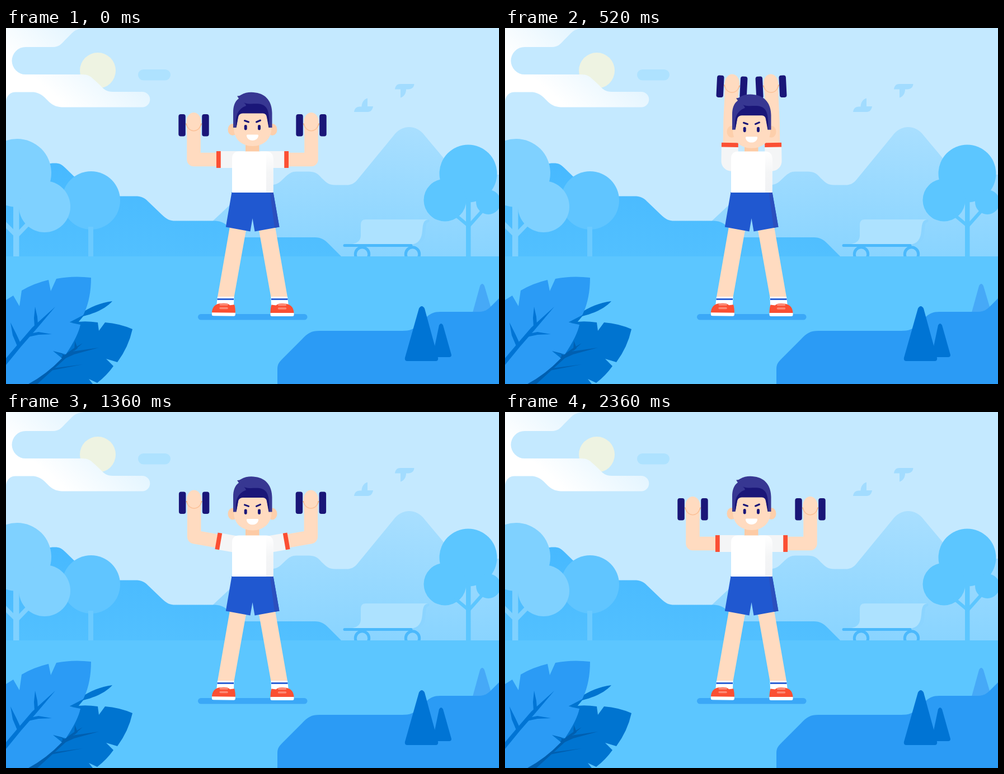
Recreate the animation shown at these times as an HTML page. Size 881 by 636 pixels, loop 2.4 s.

```html
<!DOCTYPE html>
<html lang="en">
<head>
<meta charset="utf-8">
<title>Dumbbell press</title>
<style>
html, body { margin: 0; width: 100%; height: 100%; overflow: hidden; background: #5cc6ff; }
svg { display: block; width: 100%; height: 100%; }
</style>
</head>
<body>
<svg viewBox="0 0 881 636" preserveAspectRatio="none">
  <defs>
    <linearGradient id="cloud" gradientUnits="userSpaceOnUse" x1="120" y1="0" x2="45" y2="85">
      <stop offset="0" stop-color="#e4f5ff"/><stop offset="1" stop-color="#fff"/>
    </linearGradient>
    <linearGradient id="mount" gradientUnits="userSpaceOnUse" x1="0" y1="176" x2="0" y2="408">
      <stop offset="0" stop-color="#a9dfff"/><stop offset="1" stop-color="#89d4ff"/>
    </linearGradient>
    <linearGradient id="hill" gradientUnits="userSpaceOnUse" x1="0" y1="241" x2="0" y2="408">
      <stop offset="0" stop-color="#47b9ff"/><stop offset="1" stop-color="#52c0ff"/>
    </linearGradient>
    <linearGradient id="fold" gradientUnits="userSpaceOnUse" x1="0" y1="222" x2="0" y2="294">
      <stop offset="0" stop-color="#fff"/><stop offset=".5" stop-color="#f4f5f6"/><stop offset="1" stop-color="#f1f2f4"/>
    </linearGradient>
    <clipPath id="above"><rect width="881" height="408"/></clipPath>
    <g id="bell">
      <path d="M-14.500 3h29l-3 8h-23z" fill="#e8955c"/>
      <path d="M-12.200 20V4H12.200V20z" fill="#ffdbc0"/>
      <g fill="#1a1678">
        <rect x="-27.200" y="-13.500" width="12.500" height="39.500" rx="4"/>
        <rect x="14.700" y="-13.500" width="12.500" height="39.500" rx="4"/>
      </g>
      <ellipse rx="13.200" ry="16.500" fill="#ffdbc0"/>
      <path d="M-12.500 6C-9 19.500 9 19.500 12.500 6" fill="none" stroke="#fbc197" stroke-width="1.500"/>
    </g>
    <g id="sleeve">
      <path d="M-27.500-12.700H23V-1A18 18 0 0 1 5 17.200H-27.500z" fill="#f4f5f6"/>
      <rect x="-27.800" y="-12.700" width="7.800" height="29.900" fill="#fb4f33"/>
    </g>
  </defs>

  <rect width="881" height="636" fill="#c4e9ff"/>
  <circle cx="164" cy="76" r="32" fill="#eef3e2"/>
  <path d="M0 0H141C130 1 124 3 118 9L105 22C99 29 94 34 84 34H35A24.500 24.500 0 0 0 35 83H136C146 83 151 86 157 92L168 102C175 110 180 114 191 114H243.500A13.700 13.700 0 0 1 243.500 141.500H104C91 141.500 85 139 77 132L69 124C61 117 55 114.500 46 114.500H17C8 114.500 2 120 0 130z" fill="url(#cloud)"/>
  <rect x="236" y="74" width="58" height="19.500" rx="9.700" fill="#aee2ff"/>
  <g fill="#a2dcff">
    <path d="M622 150C623 144 626 140.500 632 140.500H635.500C636 132 640 127 646 125.500V140H656C655 146 652 150 646 150z"/>
    <path d="M695 109.500C696 103 699 100 705 100H729.500C729 106 725 109.500 719 109.500H715C715 117 711 123 705 124.500V109.500z"/>
  </g>

  <path d="M350 363L428 290C436 282 442 280.500 450 280.500H472C483 280.500 488 277 496 269C505 260 510 256.500 519 256.500H541C552 256.500 557 260 564 268C573 277 578 280.500 588 280.500H608C617 280.500 622 278 628 271L692 193C707 171.500 734 171.500 749 193L790 242C800 254 815 262 881 262V408H350z" fill="url(#mount)"/>
  <path d="M0 290L62 252C70 244 76 241.500 87 241.500C96 241.500 100 244 106 250L145 288C154 297 160 300.500 170 300.500H231C242 300.500 247 303 254 310L278 333C287 342 293 344.500 303 344.500H370C382 344.500 388 347 394 352L406 363C414 371 420 374 430 374H552C563 374 569 378 576 385L599 408H0z" fill="url(#hill)"/>
  <rect y="408" width="881" height="228" fill="#5cc6ff"/>

  <circle cx="152" cy="308" r="52" fill="#60c5ff"/>
  <rect x="147" y="355" width="9" height="53" fill="#6bcaff"/>
  <g fill="#7fd1ff">
    <circle cx="20" cy="259" r="61"/>
    <circle cx="69" cy="319" r="46"/>
    <rect x="13" y="318" width="10.500" height="90"/>
    <path d="M18 370L-3 349M19 371L45 344" stroke="#7fd1ff" stroke-width="8"/>
  </g>

  <g fill="#5cc6ff">
    <circle cx="826" cy="260" r="51.500"/>
    <circle cx="784.500" cy="307.500" r="38"/>
    <circle cx="862" cy="311" r="22"/>
    <rect x="822" y="308" width="8.500" height="100"/>
    <path d="M826 353L802 333M826 355L850 328" stroke="#5cc6ff" stroke-width="6"/>
  </g>

  <path d="M754 344.500C747 346 748 354 747 365C746 380 738 386 725 386.500" fill="none" stroke="#8bd4ff" stroke-width="5" stroke-linecap="round"/>
  <path d="M612 386.500C628 386 634 380 634 370V351Q634 342 643 342H755C746 343 745 350 744 361C743 377 737 386 724 386.500z" fill="#ade2ff"/>
  <g stroke="#4bb9fc" fill="none" stroke-width="5" clip-path="url(#above)">
    <path d="M605 388.500H724" stroke-linecap="round"/>
    <circle cx="636.500" cy="404" r="12.200"/>
    <circle cx="726.500" cy="404" r="12.200"/>
  </g>

  <path d="M834 508L847 461Q851 453 855 461L869 508z" fill="#46a9f7"/>
  <path d="M485 636V609C485 601 488 597 494 591L529 556C539 545 546 541 560 541H708C722 541 729 538 737 530L747 521C757 510 765 507 776 507H845C856 507 861 503 868 496L881 483V636z" fill="#2b9bf5"/>
  <g fill="#0074d4">
    <path d="M738 501Q743 493 748 501L772 589Q773 595 768 595H717Q712 595 713 589z"/>
    <path d="M774 531Q777.500 525 781 531L796 584Q796 588 792 588H762z"/>
  </g>

  <g fill="#0074d0">
    <path d="M113 526C135 506 160 492 190 488C180 499 165 508 138 515L128 527z"/>
    <path d="M40 636L113 527Q138 522 164 526L166 541L177 526Q203 528 226 538Q219 570 199 597L179 591L192 604Q180 621 163 634L148 627L155 636z"/>
  </g>
  <g fill="#005fb0">
    <path d="M56 636L122 576L137 563L120 573L66 612L40 636z"/>
    <path d="M102 592L100 578L84 577L102 583L108 588L118 578L166 571L122 583z"/>
    <path d="M122 577L123 559L128 572zM83 608L137 601L80 612z"/>
  </g>
  <path d="M0 486L13 478L24 497L28 469Q50 456 76 450L80 470L90 448Q120 442 152 446Q152 485 138 513L113 526L133 530Q129 550 107 583L84 577L100 590Q72 619 40 636H0z" fill="#2b9bf5"/>
  <g fill="#0074d4">
    <path d="M0 590L22 564L47 535L88 498L55 537L27 569L0 602z"/>
    <path d="M51 534L50 518L52 498L56 516L57 529zM38 547L58 543L82 547L58 548L35 553zM20 568L12 549L8 526L19 548L25 561z"/>
  </g>

  <rect x="343" y="511" width="195.500" height="10.500" rx="5.200" fill="#3ba8f7"/>
  <g id="arms">
    <g><path fill="none" stroke="#ffdbc0" stroke-width="24.500" stroke-linejoin="round"/><use href="#sleeve"/><use href="#bell"/></g>
    <g transform="matrix(-1 0 0 1 881 0)"><path fill="none" stroke="#ffdbc0" stroke-width="24.500" stroke-linejoin="round"/><use href="#sleeve"/><use href="#bell"/></g>
  </g>

  <path d="M400 355L429 361L407.500 481H378zM481 355L452 361L473.500 481H503z" fill="#ffdbc0"/>
  <path d="M378 480H407.500L407 497H376zM473.500 480H503L505 497H474z" fill="#fff"/>
  <path d="M377.500 484.500H407M474 484.500H503.500" stroke="#2f63d6" stroke-width="3"/>
  <g id="shoe" transform="rotate(1 389 503)">
    <path d="M368 509.500C368 498 375 492 385 492C393 491 397 492 400 495L408 494Q410 500 410 509.500z" fill="#fb4f33"/>
    <path d="M368 508.500H410V512Q410 514.500 407 514.500H371Q368 514.500 368 512z" fill="#fff"/>
    <path d="M383 494H395M383 500.500H395" stroke="#fd8b76" stroke-width="3.500" stroke-linecap="round"/>
  </g>
  <use href="#shoe" transform="matrix(-1 0 0 1 882.500 .5) rotate(-1 389 503)"/>

  <path d="M403.500 293H477.500L488.500 355.500L444.500 363.500L440.500 340L436.500 363.500L392.800 355.500z" fill="#2058d0"/>
  <path d="M471.500 293H477.500L488.500 355.500L480 357z" fill="#2b4fbd"/>
  <rect x="428" y="200" width="24.500" height="24" fill="#fdcba5"/>
  <path d="M404 294V233Q404 220.500 417 220.500H464Q477.500 220.500 477.500 233V294z" fill="#fff"/>
  <path d="M465 294V222Q477.500 222 477.500 234V294z" fill="url(#fold)"/>

  <g id="head">
    <g fill="#fdcfab"><ellipse cx="405" cy="181.500" rx="8.500" ry="10.500"/><ellipse cx="476" cy="181.500" rx="8.500" ry="10.500"/></g>
    <path d="M407 148H474.500V178C474.500 199 460 211 440.700 211S407 199 407 178z" fill="#ffdbc0"/>
    <path d="M406 178V151C406 139 409 131 416 126L413 121.500Q417 122 420 119.500C428 115 437 114 446 115.500C465 118 475.500 132 475.500 152V178H470L465 152H416L411.500 178z" fill="#373792"/>
    <path d="M411.500 178C409 159 413 145 429 139Q428 135 425 133.500C437 138 447 133 458 137C468 141 471 151 470.500 178H469.500L466 159Q465 152.500 459 152.500H423Q416.500 152.500 415 159z" fill="#1a1678"/>
    <path d="M426.500 165.500L433.500 168M447.500 168L454.500 165" stroke="#1a1678" stroke-width="3" stroke-linecap="round"/>
    <g fill="#1a1678"><rect x="425.700" y="173" width="5" height="9.500" rx="2.400"/><rect x="450" y="173" width="5" height="9.500" rx="2.400"/></g>
    <path d="M431.500 190.500H449.500Q451.500 190.500 451 193C449 203.500 432 203.500 430 193Q429.500 190.500 431.500 190.500z" fill="#fff"/>
  </g>
</svg>
<script>
const LOOP = 2400, STEP = 40;
const PIVOT = { x: 403.75, y: 232.75 };
const head = document.getElementById('head');
const arms = [...document.getElementById('arms').children];

const lift = [[0, 0], [40, .04], [280, .71], [440, .985], [520, 1.01], [720, 1.005], [960, 1],
  [1000, .99], [1120, .72], [1360, .11], [1480, .02], [1640, 0], [2400, 0]];
const lean = [[0, 0], [280, 0], [520, 2.8], [1000, 0], [2400, 0]];
const tilt = [[0, 0], [280, -2.5], [480, 0], [2400, 0]];

// Monotone cubic through the keys, flat at both ends.
function ease(keys, t) {
  const slope = i => (keys[i + 1][1] - keys[i][1]) / (keys[i + 1][0] - keys[i][0]);
  const tangent = i => {
    if (i === 0 || i === keys.length - 1) return 0;
    const a = slope(i - 1), b = slope(i);
    return a * b > 0 ? 2 * a * b / (a + b) : 0;
  };
  let i = 0;
  while (i < keys.length - 2 && t >= keys[i + 1][0]) i++;
  const [t0, v0] = keys[i], [t1, v1] = keys[i + 1];
  const d = t1 - t0, u = (t - t0) / d, w = 1 - u;
  return v0 * (1 + 2 * u) * w * w + v1 * u * u * (3 - 2 * u) +
    d * u * w * (tangent(i) * w - tangent(i + 1) * u);
}

function poseArm(arm, angle, lean, tilt) {
  const [limb, sleeve, bell] = arm.children;
  const a = angle * Math.PI / 180, b = lean * Math.PI / 180;
  const cos = Math.cos(a), sin = Math.sin(a);
  const at = (x, y) => [PIVOT.x + x * cos - y * sin, PIVOT.y + x * sin + y * cos];
  const shoulder = at(0, 2.25), elbow = at(-68.25, 2.25);
  const reach = 67.5 - 2 * sin;
  const hand = [elbow[0] + reach * Math.sin(b), elbow[1] - reach * Math.cos(b)];
  limb.setAttribute('d', `M${shoulder}L${elbow}L${hand}`);
  sleeve.setAttribute('transform', `translate(${PIVOT.x} ${PIVOT.y}) rotate(${angle})`);
  bell.setAttribute('transform', `translate(${hand}) rotate(${lean + tilt})`);
}

function draw(time) {
  const t = Math.floor(time % LOOP / STEP) * STEP;
  const up = ease(lift, t), bend = ease(lean, t);
  poseArm(arms[0], up * 90, bend, 0);
  poseArm(arms[1], up * 90, bend, ease(tilt, t));
  head.setAttribute('transform', `translate(0 ${up * 3.7})`);
}

let start;
function tick(now) {
  start ??= now;
  draw(now - start);
  requestAnimationFrame(tick);
}
draw(0);
requestAnimationFrame(tick);
</script>
</body>
</html>
```
